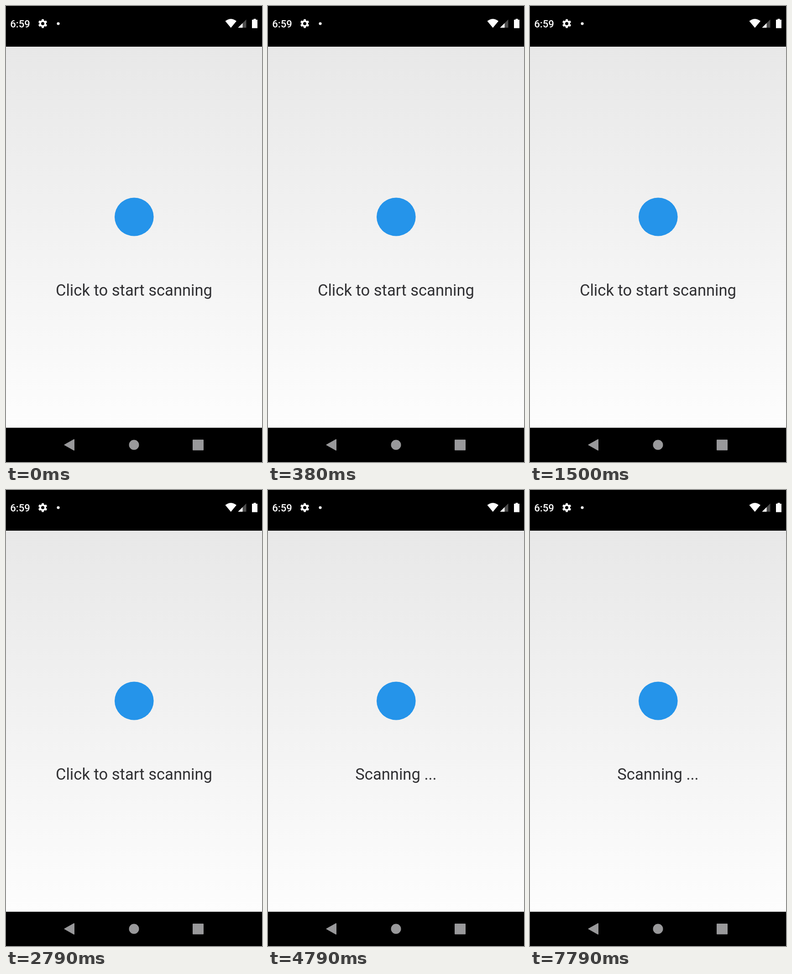
Recreate the animation shown at these times as an HTML page. Size 561 px wide and 998 px high, loop 8 s.

```html
<!DOCTYPE html>
<html lang="en">
<head>
<meta charset="utf-8">
<title>Scanner</title>
<style>
  html, body { margin: 0; width: 100%; height: 100%; overflow: hidden; background: #000; }
  svg { display: block; width: 100%; height: 100%; }
  text { font-family: Roboto, sans-serif; }
</style>
</head>
<body>
<svg viewBox="0 0 561 998">
  <defs>
    <linearGradient id="page" x2="0" y2="1">
      <stop offset="0" stop-color="#e8e8e8"/>
      <stop offset=".5" stop-color="#f2f2f2"/>
      <stop offset="1" stop-color="#fdfdfd"/>
    </linearGradient>
    <path id="teeth" d="M-2.1-9.8H2.1L2.9-5V5L2.1 9.8H-2.1L-2.9 5V-5Z"/>
  </defs>
  <rect width="561" height="998"/>
  <rect y="89" width="561" height="834" fill="url(#page)"/>

  <!-- Status bar -->
  <g fill="#fff">
    <text x="9.3" y="47" font-size="22" font-weight="500">6:59</text>
    <g transform="translate(80.5 38.5)">
      <use href="#teeth"/>
      <use href="#teeth" transform="rotate(60)"/>
      <use href="#teeth" transform="rotate(120)"/>
      <circle r="7.3"/>
      <circle r="3.5" fill="#000"/>
    </g>
    <circle cx="114.5" cy="38.5" r="3.1"/>
    <path d="M480.5 33Q492.8 23.500 505 33L492.800 47.800Z"/>
    <path d="M508.500 47.500L526.500 29.500V47.500Z" fill="#4d4d4d"/>
    <path d="M508.500 47.500L518.500 37.500V47.500Z"/>
    <path d="M542.500 28H547.500V30H551V48.500H539V30H542.500Z"/>
  </g>

  <!-- Scan button and label -->
  <ellipse cx="280.800" cy="461.500" rx="42.800" ry="42" fill="#2594ea"/>
  <text id="label" x="280.500" y="633.500" font-size="34.600" text-anchor="middle" fill="#303033">Click to start scanning</text>

  <!-- Navigation bar -->
  <g fill="#99999b" stroke="#99999b" stroke-width="2" stroke-linejoin="round">
    <path d="M128.500 960.500L149 949V972Z"/>
    <circle cx="280.500" cy="960.500" r="10"/>
    <rect x="410" y="950" width="22" height="21.500"/>
  </g>
</svg>
<script>
  const LOOP_MS = 8000;
  const SCAN_START_MS = 3290;
  const label = document.getElementById('label');
  const start = performance.now();

  function draw(now) {
    const time = Math.max(0, now - start) % LOOP_MS;
    const message = time < SCAN_START_MS ? 'Click to start scanning' : 'Scanning ...';
    if (label.textContent !== message) label.textContent = message;
    requestAnimationFrame(draw);
  }
  requestAnimationFrame(draw);
</script>
</body>
</html>
```
